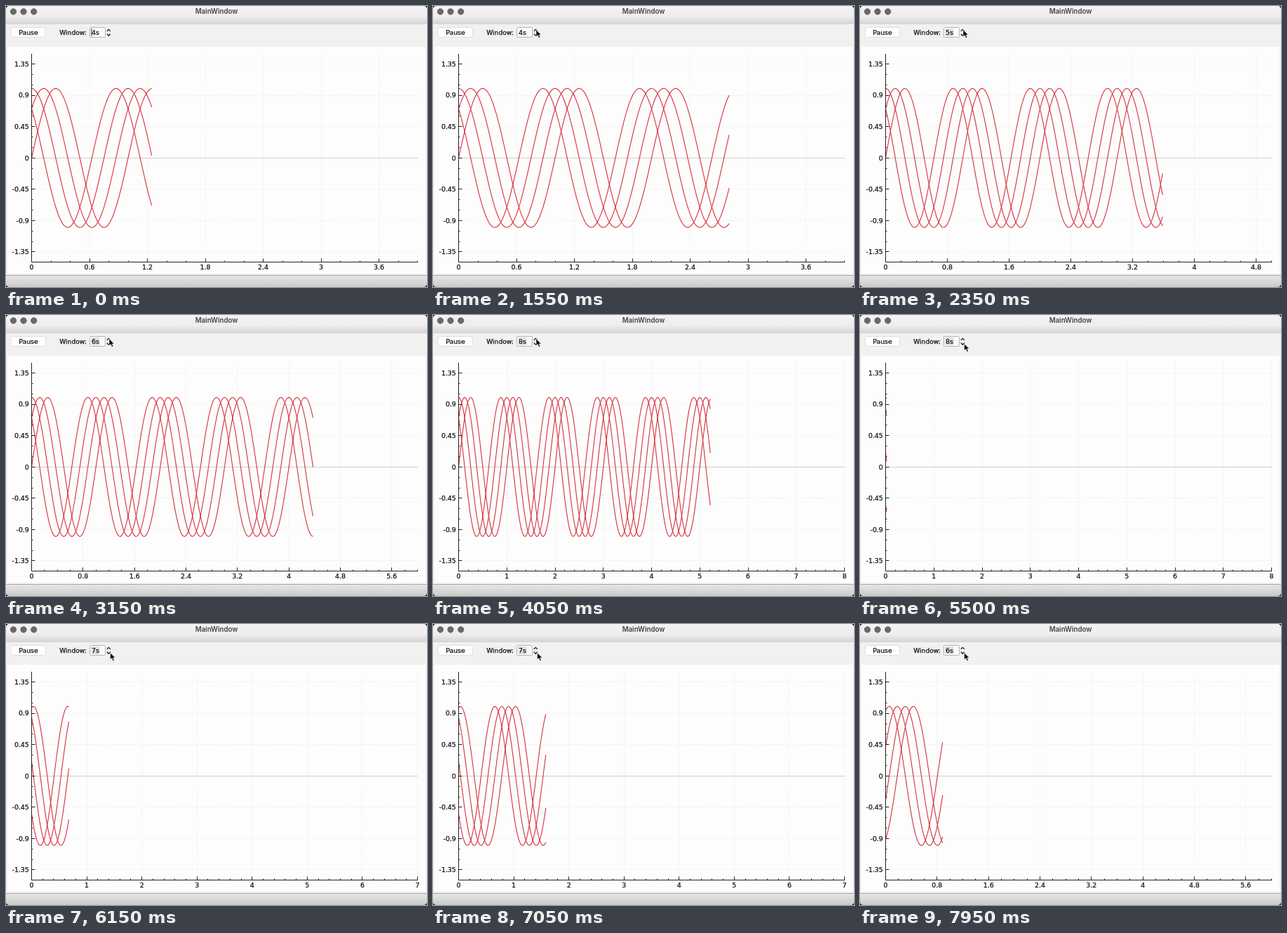
Recreate the animation shown at these times as an HTML page. Size 600 by 400 pixels, loop 8000 ms.

```html
<!DOCTYPE html>
<html lang="en">
<head>
<meta charset="utf-8">
<title>MainWindow</title>
<style>
  html, body { margin: 0; width: 100%; height: 100%; overflow: hidden; background: #222; }
  svg { display: block; width: 100vw; height: 100vh; }
  text { font: 9.4px "DejaVu Sans", sans-serif; fill: #111; stroke: #111; stroke-width: 0.25; }
  .title { font: 600 9.7px Inter, sans-serif; fill: #444; stroke: none; }
  .grid { fill: none; stroke: #e4e4e2; stroke-dasharray: 1 2; }
  .axis { fill: none; stroke: #222; }
  .curve { fill: none; stroke: #d5303a; stroke-width: 1.1; stroke-linejoin: round; }
  .chevron { fill: none; stroke: #222; stroke-width: 1.3; }
</style>
</head>
<body>
<svg viewBox="0 0 600 400">
  <defs>
    <linearGradient id="top" x1="0" y1="0" x2="0" y2="1">
      <stop offset="0" stop-color="#f4f2f4"/>
      <stop offset="0.6" stop-color="#eeecee"/>
      <stop offset="1" stop-color="#d4d4d4"/>
    </linearGradient>
    <linearGradient id="bottom" x1="0" y1="0" x2="0" y2="1">
      <stop offset="0" stop-color="#e8e8e8"/>
      <stop offset="1" stop-color="#cacaca"/>
    </linearGradient>
  </defs>
  <rect width="600" height="400" rx="5" fill="#f1f1f0"/>
  <path d="M0 26V5a5 5 0 0 1 5-5H595a5 5 0 0 1 5 5V26Z" fill="url(#top)"/>
  <path d="M0 383H600V395a5 5 0 0 1-5 5H5a5 5 0 0 1-5-5Z" fill="url(#bottom)"/>
  <path d="M0 383.5H600" stroke="#a8a8a6"/>
  <rect x="2" y="58" width="596" height="323" fill="#fdfdfe"/>

  <g fill="#696967" stroke="#555553" stroke-width="0.7">
    <circle cx="10.5" cy="8" r="4.2"/>
    <circle cx="25" cy="8" r="4.2"/>
    <circle cx="39.7" cy="8" r="4.2"/>
  </g>
  <text class="title" x="300" y="11" text-anchor="middle">MainWindow</text>

  <rect x="7" y="30.5" width="49.5" height="14" rx="3.5" fill="#fefefe" stroke="#d8d8d6" stroke-width="0.8"/>
  <text x="32" y="40.5" text-anchor="middle">Pause</text>
  <text x="76.3" y="40.5" style="font-size:9.1px">Window:</text>
  <rect x="119.5" y="30.5" width="22" height="14" rx="1" fill="#fafafa" stroke="#b4b4b4"/>
  <rect id="mark" x="121.5" y="32" width="12" height="11" fill="#e4e4e4"/>
  <text id="value" x="122" y="41"></text>
  <path id="caret" d="M122 32V43" stroke="#222"/>
  <path class="chevron" d="M143.8 35.8L146.3 33.3L148.8 35.8M143.8 39.8L146.3 42.3L148.8 39.8"/>

  <path id="grid" class="grid"/>
  <path d="M37 216.5H587" stroke="#cdcdca"/>
  <g id="curves"></g>
  <path id="axis" class="axis"/>
  <g id="labels"></g>
  <path id="cursor" d="M0 0V9.6L2.3 7.6L4 11.4L5.8 10.6L4.1 7H7.2Z" fill="#0c0c0c" stroke="#fff" stroke-width="0.5"/>
</svg>
<script>
const LOOP = 8000, FRAME = 50;
const LEFT = 36.5, WIDTH = 550, BOTTOM = 364.5, TOP = 68, MID = 216.3, UNIT = 99;
const $ = id => document.getElementById(id);
const NS = "http://www.w3.org/2000/svg";

// [time, value] lists, in seconds
const windows = [[0, 4], [1.9, 5], [2.6, 6], [3.5, 7], [3.95, 8], [5.55, 7], [7.1, 6]];
const clock = [[0, 1.245], [1.55, 2.804], [3.15, 4.375], [4.05, 5.218], [5.48, 6.217], [8, 8.756]];
const cursorX = [[0.95, 188], [1.35, 147], [4.4, 147], [4.7, 148.5]];
const cursorY = [[0.95, 78], [1.35, 34], [4.4, 34], [4.7, 41]];
const resets = [[0, 0], [5.48, 6.217], [7.07, 7.819]];

const hold = (list, t) => list.filter(p => p[0] <= t).pop()[1];

function lerp(list, t) {
  if (t <= list[0][0]) return list[0][1];
  for (let i = 1; i < list.length; i++) {
    const [a, u] = list[i - 1], [b, v] = list[i];
    if (t <= b) return u + (v - u) * (t - a) / (b - a);
  }
  return list[list.length - 1][1];
}

// Rounds the step down to halves or even numbers of its decade
function tickStep(range) {
  const raw = range / (6 + 1e-9);
  const mag = 10 ** Math.floor(Math.log10(raw));
  const m = raw / mag;
  return (m < 5 ? Math.floor(m * 2) / 2 : Math.floor(m / 2) * 2) * mag;
}

const px = (x, span) => LEFT + x / span * WIDTH;
const py = y => MID - y * UNIT;
const crisp = v => Math.floor(v) + 0.5;
const label = (x, y, anchor, v) =>
  `<text x="${x}" y="${y}" text-anchor="${anchor}">${+v.toFixed(2)}</text>`;

function drawAxes(span) {
  const step = tickStep(span);
  const subs = step > 0.9 ? 5 : step > 0.7 ? 4 : 3;
  let grid = "", text = "", axis = `M${LEFT} ${TOP}V${BOTTOM}H587`;
  for (let i = 0; i * step / subs <= span + 1e-6; i++) {
    const x = px(i * step / subs, span), major = i % subs === 0;
    axis += `M${crisp(x)} ${BOTTOM}v${major ? -5 : -2}`;
    if (!major) continue;
    if (i) grid += `M${crisp(x)} ${TOP}V${BOTTOM}`;
    text += label(x, 375, "middle", i / subs * step);
  }
  for (let i = -9; i <= 9; i++) {
    const v = i * 0.15, y = py(v), major = i % 3 === 0;
    axis += `M${LEFT} ${crisp(y)}h${major ? 5 : 2}`;
    if (!major) continue;
    if (i) grid += `M37 ${crisp(y)}H587`;
    text += label(32.8, y + 3.2, "end", v);
  }
  $("grid").setAttribute("d", grid);
  $("axis").setAttribute("d", axis);
  $("labels").innerHTML = text;
}

const curves = [0, 1, 2, 3].map(() => {
  const p = document.createElementNS(NS, "path");
  p.setAttribute("class", "curve");
  return $("curves").appendChild(p);
});

function drawCurves(start, end, span) {
  const n = Math.max(1, Math.ceil((end - start) / 0.02));
  curves.forEach((curve, k) => {
    let d = "";
    for (let i = 0; i <= n; i++) {
      const x = (end - start) * i / n;
      const y = Math.sin(2 * Math.PI * (start + x + k / 8));
      d += (i ? "L" : "M") + px(x, span).toFixed(2) + " " + py(y).toFixed(2);
    }
    curve.setAttribute("d", d);
  });
}

const show = (id, on) => $(id).setAttribute("visibility", on ? "visible" : "hidden");

let lastSpan;
function render(t) {
  const span = hold(windows, t);
  if (span !== lastSpan) {
    drawAxes(span);
    $("value").textContent = span + "s";
    lastSpan = span;
  }
  drawCurves(hold(resets, t), lerp(clock, t), span);
  show("caret", t < 0.4);
  show("mark", t >= 1.9);
  show("cursor", t >= 0.95);
  $("cursor").setAttribute("transform", `translate(${lerp(cursorX, t)} ${lerp(cursorY, t)})`);
}

const begin = performance.now();
function tick() {
  const ms = (performance.now() - begin) % LOOP;
  render(Math.floor(ms / FRAME) * FRAME / 1000);
  requestAnimationFrame(tick);
}
tick();
</script>
</body>
</html>
```
